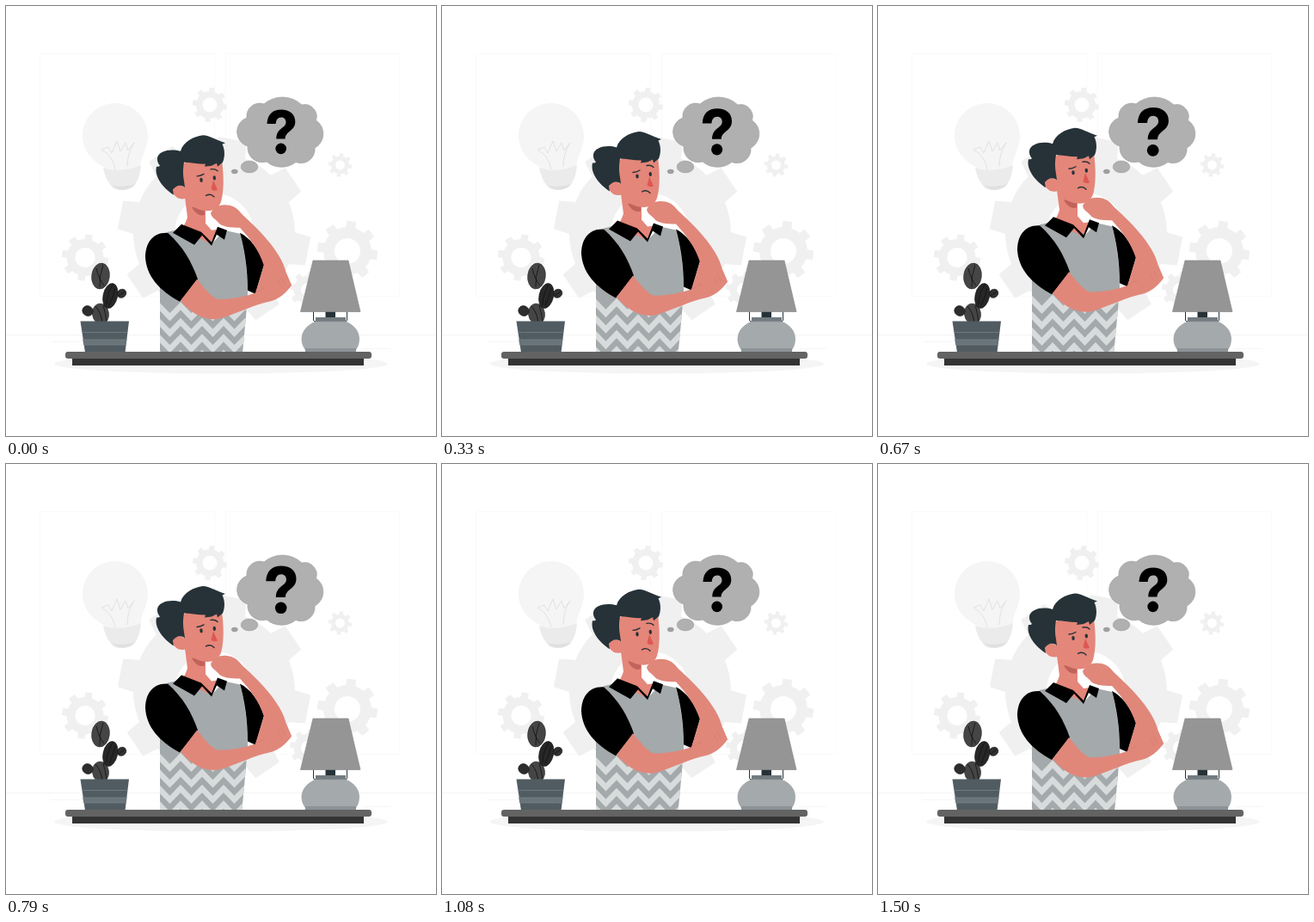
Recreate the animation shown at these times as an HTML page with a canvas. Size 500 px wide and 500 px high, loop 1540 ms.

```html
<!DOCTYPE html>
<html>
<head>
<meta charset="utf-8">
<style>
html, body { margin: 0; width: 100%; height: 100%; overflow: hidden; background: #fff; }
canvas { display: block; width: 500px; height: 500px; }
</style>
</head>
<body>
<canvas id="stage" width="500" height="500"></canvas>
<script>
const LOOP = 1540;
const canvas = document.getElementById('stage');
const ratio = window.devicePixelRatio || 1;
canvas.width = canvas.height = 500 * ratio;
const ctx = canvas.getContext('2d');

const SKIN = '#e0877a', FACE = '#e48679', HAIR = '#263238', VEST = '#a4a9ab', LIGHT = '#d8dbdc';
const BLACK = '#000', PALE = '#f0f0f0';

function fill(d, color) {
  ctx.fillStyle = color;
  ctx.fill(new Path2D(d));
}
function line(d, color, width = 1) {
  ctx.strokeStyle = color;
  ctx.lineWidth = width;
  ctx.stroke(new Path2D(d));
}
function oval(x, y, rx, ry, color, turn = 0, edge) {
  ctx.beginPath();
  ctx.ellipse(x, y, rx, ry, turn, 0, Math.PI * 2);
  ctx.fillStyle = color;
  ctx.fill();
  if (edge) {
    ctx.strokeStyle = edge;
    ctx.lineWidth = 0.7;
    ctx.stroke();
  }
}

function gear(x, y, outer, body, hole, degrees) {
  ctx.save();
  ctx.translate(x, y);
  ctx.rotate(degrees * Math.PI / 180);
  ctx.fillStyle = PALE;
  const inner = body * 0.21, tip = outer * 0.15;
  for (let i = 0; i < 8; i++) {
    ctx.beginPath();
    ctx.moveTo(body * 0.9, -inner);
    ctx.lineTo(outer, -tip);
    ctx.lineTo(outer, tip);
    ctx.lineTo(body * 0.9, inner);
    ctx.fill();
    ctx.rotate(Math.PI / 4);
  }
  ctx.beginPath();
  ctx.arc(0, 0, body, 0, Math.PI * 2);
  ctx.arc(0, 0, hole, 0, Math.PI * 2, true);
  ctx.fill();
  ctx.restore();
}

function drawRoom() {
  line('M39.5 55.5H242.5V337.5H39.5Z M255.5 55.5H457.5V337.5H255.5Z', '#fafafa');
  line('M0 382.5H500', '#f4f4f4');
  line('M415 398.5H447 M52 390.5H86', '#f6f6f6');
  oval(250, 416, 194, 11.5, '#f5f5f5');
  gear(242, 264, 111, 94, 46, 11);
  gear(237, 115, 20, 16, 8.5, 8);
  gear(388.5, 185, 13.7, 10.5, 5.5, 8);
  gear(397, 285, 35, 28, 15, 8);
  gear(92, 292.5, 27, 21.5, 11.5, 10);
  gear(351, 330, 21, 16.5, 8, 10);
}

function drawBulb() {
  fill('M114 187C100 180 89 168 89 151C89 130 106 113 127 113C148 113 165 130 165 151C165 167 156 174 156 190C143 196 128 197 116 195Z', '#f5f5f5');
  fill('M113 188C127 193 143 191 157 185C156 197 153 204 149 209C143 214 133 216 125 212C119 206 115 199 113 188Z', '#ebebeb');
  fill('M122 208C131 211 141 210 150 207C145 214 132 217 122 208Z', '#e0e0e0');
  line('M127 190Q124 174 111 167L119 164L123 171L129 157L133 169L139 159L142 168L149 159Q141 171 141 187', '#e2e2e2');
}

function drawCloud() {
  const gray = '#b0b0b0', edge = '#a2a2a2';
  const cloud = 'M280 130A15 15 0 0 1 300 114A32.7 32.7 0 0 1 344 115A14 14 0 0 1 360.5 133A18.7 18.7 0 0 1 359 165A16 16 0 0 1 337 181.5A27 27 0 0 1 303 181A17 17 0 0 1 281 163A17.4 17.4 0 0 1 280 130Z';
  fill(cloud, gray);
  line(cloud, edge, 0.7);
  oval(283, 187, 9.8, 6.9, gray, 0, edge);
  oval(265.8, 192.5, 3.5, 2.4, '#a0a0a0', 0, '#959595');
}

function drawQuestion(scale) {
  ctx.save();
  ctx.translate(320, 146.3);
  ctx.scale(scale, scale);
  ctx.translate(-320, -146.3);
  fill('M303.5 137C304 126 310 120.500 320 120.500C330 120.500 336.300 126 336.300 134.500C336.300 145.500 324.600 145.500 324.600 154.500H314.300C314.300 141.500 325.500 142.500 325.500 135C325.500 131.500 323 129.500 320 129.500C316 129.500 314 132.500 313.700 137Z', BLACK);
  oval(319.7, 165.9, 6.3, 6.3, BLACK);
  ctx.restore();
}

function drawPlant() {
  oval(110, 358, 9.5, 12, '#454545', -0.15, '#333');
  oval(95, 354.5, 6.3, 5.8, '#2d2d2d', 0.5, '#1b1b1b');
  oval(134.5, 334.3, 5.5, 4.8, '#303030', -0.6, '#1b1b1b');
  oval(121.3, 337, 8.3, 14.7, '#272727', 0.22, '#111');
  oval(110, 314, 10.3, 15, '#454545', 0.12, '#333');
  line('M105 305Q108 318 114 325M113 301Q108 315 109 327M104 349Q111 357 112 369M113 348Q116 358 117 367M124 324Q117 336 117 347M127 328Q124 340 120 348M131 337L138 332', '#111', 0.8);
  fill('M86.500 366.500H143L138.500 403H92Z', '#515c62');
  fill('M89.300 388H140.300L139.500 394H90.200Z', '#68747a');
  line('M88 379.500H141.500M89.500 388H140.500M90.500 394H139.700', '#768187', 0.8);
}

function drawLamp() {
  line('M357.500 355V365Q357.500 367 360 367H394Q396.500 367 396.500 365V355', HAIR, 1);
  fill('M371.500 355H383V363H371.500Z', HAIR);
  fill('M360 362H395V367H360Z', '#727b80');
  const base = 'M361 367H394C404 370 410.500 378 410.500 387C410.500 394 408 398 405 402H350C347 398 344 394 344 387C344 378 351 370 361 367Z';
  fill(base, '#a4a9ac');
  line(base, '#959b9e', 0.7);
  fill('M348 398H407V402.500H348Z', '#8c9397');
  const shade = 'M357 296H398L412 355.500H342.500Z';
  fill(shade, '#959595');
  line(shade, '#898989', 0.7);
}

function drawVest() {
  const shape = new Path2D('M188 263L205 259L239 277L254 261L272 265C278 285 281 312 281 340L274 415H179V300Z');
  ctx.save();
  ctx.clip(shape);
  ctx.fillStyle = VEST;
  ctx.fillRect(150, 240, 150, 180);
  ctx.strokeStyle = LIGHT;
  ctx.lineWidth = 6.5;
  ctx.lineJoin = 'miter';
  const halfWave = 12.5;
  for (let y = 355.5; y < 425; y += 18.5) {
    ctx.beginPath();
    for (let i = -1; i < 11; i++) ctx.lineTo(178 + i * halfWave, y + (i % 2 ? 6.5 : -6.5));
    ctx.stroke();
  }
  ctx.restore();
}

function drawHead() {
  fill('M207 215L211 246C209 252 207 256 204 259L238 277L246 260L239 261L232 253V234Z', FACE);
  fill('M216 234C220 242 226 245 231 243V236Z', '#c0635b');
  fill('M206 184C216 176 240 176 251 180C253.500 198 253.500 216 250 228C246 238 237 239.500 229 238C220 236 213 232 208 224C202 226 195 222 194 216C194 210 201 206 207 211Z', FACE);
  fill('M207 182C205 192 207 203 208 211C203 207 197 209 194 214L195 220C183 212 172 199 175 187C177 187 178 187 179 186C174 180 175 173 182 170C188 167 196 167 203 169C206 158 218 152 229 150.500C237 150.500 243 156 255 159.500L251.500 161C255 168 254.500 176 252 182L246 187L245 183L239 186L231 187L232 184C222 184 214 182 207 182Z', HAIR);
  oval(227, 202.5, 1.7, 2.6, HAIR, -0.1);
  oval(242.3, 200, 1.7, 2.6, HAIR, -0.1);
  ctx.lineCap = 'round';
  line('M222 198Q226 198 230 195.500M238 190Q243 189 246 192', HAIR, 1.4);
  line('M232.500 220.500Q238 217.500 242 222', HAIR, 1.4);
  ctx.lineCap = 'butt';
  fill('M241 203L246 214Q241 216 238.500 213Z', '#de5753');
}

function drawPerson(lift) {
  ctx.save();
  ctx.translate(0, -lift);
  drawVest();
  drawHead();
  fill('M204 254L194 264L219 278L228 267L239 279L245 266L254 272L257 261L246 257L239 275L227 263Z', BLACK);
  fill('M188 264C170 263 162 277 162 292C163 314 178 331 202 344L223 318C216 298 206 280 188 264Z', BLACK);
  fill('M272 264C284 270 295 284 300 301L290 335L281 331C281 305 277 282 272 264Z', BLACK);
  fill('M238 241C242 233 250 230 260 232C267 233.500 271 238 275 243C289 256 320 284 326 311L332 325C326 334 314 334 305 338L290 334L300 302C294 284 284 271 272 258C262 258 250 257 247 252C244 248 239 247 238 241Z', SKIN);
  fill('M203 343L222 318C230 327 236 336 245 341C260 342 278 338 290 334C296 326 306 320 318 316L326 311L332 325C326 334 316 342 306 344C290 347 268 358 248 364C228 367 212 354 203 343Z', SKIN);
  line('M316 319L321 328M320 316L325 325M290 334Q297 329 302 328', '#d67d72', 0.7);
  ctx.restore();
}

function drawDesk() {
  ctx.fillStyle = '#333';
  ctx.fillRect(77, 409, 339, 9);
  ctx.fillStyle = '#636363';
  ctx.beginPath();
  ctx.roundRect(69, 402, 356, 8, 3);
  ctx.fill();
}

// Two beats, the second one fading out more slowly, then a rest.
function heartbeat(p) {
  const stops = [[0, 0], [0.14, 1], [0.28, 0], [0.42, 1], [0.7, 0], [1, 0]];
  const i = stops.findIndex(stop => p < stop[0]);
  const [start, from] = stops[i - 1], [end, to] = stops[i];
  const u = (p - start) / (end - start);
  return 1 + 0.1 * (from + (to - from) * u * u * (3 - 2 * u));
}

function draw(now) {
  const time = now % LOOP;
  const lift = 4.4 * (1 + Math.cos(2 * Math.PI * (time - 710) / LOOP));
  ctx.setTransform(ratio, 0, 0, ratio, 0, 0);
  ctx.fillStyle = '#fff';
  ctx.fillRect(0, 0, 500, 500);
  drawRoom();
  drawBulb();
  drawCloud();
  drawQuestion(heartbeat(time / LOOP));
  drawPerson(lift);
  drawPlant();
  drawLamp();
  drawDesk();
}

let began;
function tick(now) {
  began ??= now;
  draw(now - began);
  requestAnimationFrame(tick);
}
draw(0);
requestAnimationFrame(tick);
</script>
</body>
</html>
```
